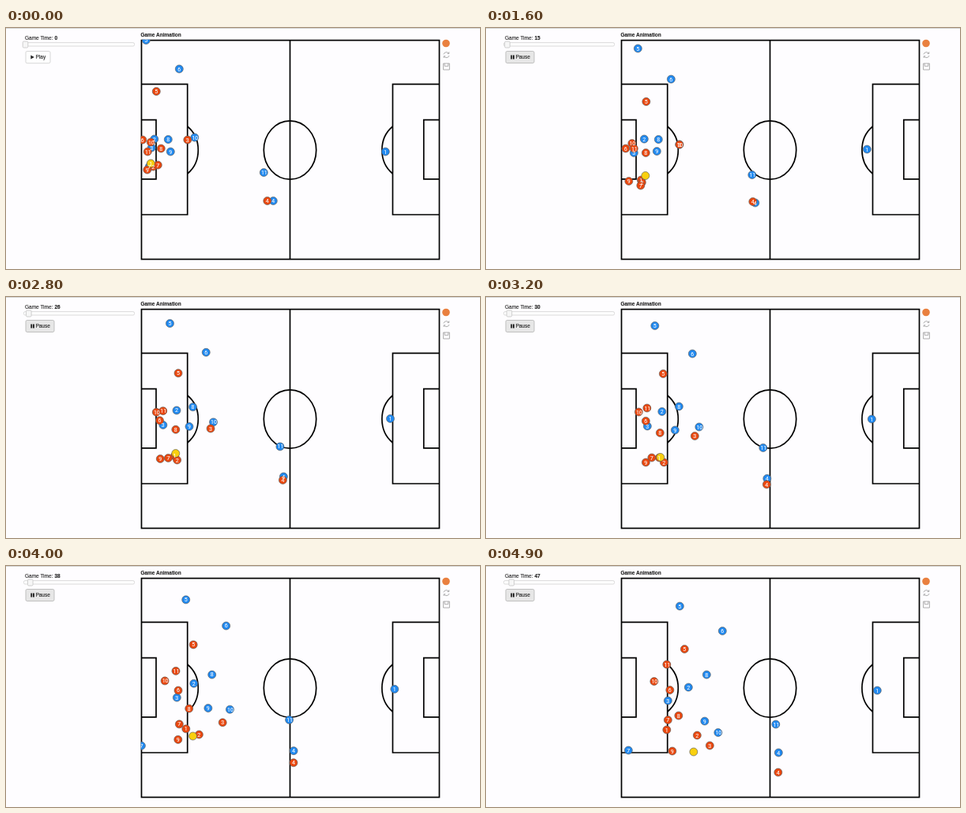
An HTML page that plays this animation: 600 by 306 pixels, repeating every 5 s.

```html
<!DOCTYPE html>
<html lang="en">
<head>
<meta charset="utf-8">
<title>Game Animation</title>
<style>
  html, body { margin: 0; width: 100%; height: 100%; overflow: hidden; background: #fefdff; }
  svg { display: block; width: 100vw; height: 100vh; }
  text { font: 6.5px "Liberation Sans", Arial, Helvetica, sans-serif; fill: #222; stroke: #222; stroke-width: .12; white-space: pre; }
  .bold { font-weight: bold; }
  .pitch { fill: none; stroke: #000; stroke-width: 1.7; }
  .box { stroke-width: .8; }
  .dots circle { stroke: #5c5c5c; stroke-width: .65; }
  .dots text { font: 7px Roboto, "Liberation Sans", sans-serif; fill: #fff; stroke: #fff; }
  .tool { fill: none; stroke: #a5a5a5; stroke-width: .9; }
</style>
</head>
<body>
<svg viewBox="0 0 600 306">
  <defs>
    <clipPath id="field"><rect x="170.5" y="14.7" width="378.6" height="279.6"/></clipPath>
  </defs>
  <rect width="600" height="1" fill="#d6d6d6"/>

  <text x="24" y="14.6">Game Time: </text>
  <text id="clock" class="bold" x="61.4" y="14.6">0</text>
  <rect class="box" x="22.5" y="18.6" width="140" height="4.4" rx="1.6" fill="#fdfdfd" stroke="#d2d2d2"/>
  <rect class="box" id="handle" x="21.2" y="17" width="6.6" height="8" rx="1.4" fill="#f6f6f6" stroke="#c4c4c4"/>

  <g id="play">
    <rect class="box" x="25" y="29.5" width="31" height="15.2" rx="1.8" fill="#fff" stroke="#ccc"/>
    <path d="M31.3 34.6L35.8 37L31.3 39.4Z" fill="#222"/>
    <text x="37.6" y="39.3">Play</text>
  </g>
  <g id="pause">
    <rect class="box" x="25" y="29.5" width="36" height="15" rx="1.8" fill="#e7e7e7" stroke="#b3b3b3"/>
    <path d="M31.3 34.6h1.9v4.8h-1.9zM34 34.6h1.9v4.8h-1.9z" fill="#222"/>
    <text x="37.4" y="39.3">Pause</text>
  </g>

  <text class="bold" x="170.4" y="10.6">Game Animation</text>

  <g class="pitch">
    <rect x="171.5" y="15.6" width="377" height="278"/>
    <path d="M359.5 15.6V293.6"/>
    <ellipse cx="359.5" cy="155" rx="33.2" ry="37.2"/>
    <path d="M171.5 71.3H229.7V237H171.5M171.5 116.7H190V191.8H171.5"/>
    <path d="M548.5 71.3H489.5V237H548.5M548.5 116.7H528.8V191.8H548.5"/>
    <path d="M229.7 125A33.2 37.2 0 0 1 229.7 185M489.5 125A33.2 37.2 0 0 0 489.5 185"/>
  </g>

  <g class="dots" clip-path="url(#field)" transform="translate(.3 0)">
    <g id="blue" fill="#2089f0"></g>
    <g id="red" fill="#ea470e"></g>
    <g id="ball" fill="#f9d00f"></g>
    <g id="labels"></g>
  </g>

  <circle cx="557" cy="19.5" r="4.8" fill="#e9803f"/>
  <g class="tool">
    <path d="M554 33.4A3.6 3.6 0 0 1 560.4 32.2M561 35A3.6 3.6 0 0 1 554.6 36.2"/>
    <path d="M560.8 30.4V32.6H558.6M554.2 38V35.8H556.4"/>
    <path d="M553.6 45H561.4V53H553.6ZM555.2 45V48.4H559.8V45"/>
  </g>
</svg>
<script>
const LOOP = 5000, STEP = 100;
const KEYS = [0, 15, 30, 47]; // game times of each runner's four points
const $ = id => document.getElementById(id);
const dots = [];

function make(tag, parent, attrs = {}) {
  const el = document.createElementNS("http://www.w3.org/2000/svg", tag);
  set(el, attrs);
  return $(parent).appendChild(el);
}

function set(el, attrs) {
  for (const k in attrs) el.setAttribute(k, attrs[k]);
}

function add(group, label, ...points) {
  const circle = make("circle", group, { r: 5 });
  const text = make("text", "labels");
  text.textContent = label;
  dots.push({ points, circle, text, shift: label.length > 1 ? 3.4 : 2 });
}

// Players are numbered in the order listed
const team = (group, runs) => runs.forEach((run, i) => add(group, String(i + 1), ...run));

team("blue", [
  [[480, 157], [482, 154], [488, 155], [495, 158]],
  [[187.5, 141], [200, 141], [222.5, 145.5], [256, 154]],
  [[184, 152], [187, 158.5], [204, 164], [230, 171]],
  [[338, 219.5], [340.5, 222], [355.5, 230.5], [370, 237]],
  [[177, 15.5], [192, 26], [213.5, 36.5], [245, 51]],
  [[219, 52], [234, 65], [261, 72], [299, 82.5]],
  [[181, 176], [163, 194], [165, 218], [180, 234]],
  [[205, 141.5], [218, 141.5], [244, 139], [279, 138]],
  [[208, 157], [216, 156.5], [239, 169], [276.5, 197]],
  [[238.5, 139], [244.5, 148], [269.5, 165], [293.5, 211.5]],
  [[326, 183.5], [336.5, 186.5], [350.5, 191.5], [366.5, 201]]
]);
team("red", [
  [[183, 172.5], [196, 193], [219, 204], [228.5, 208]],
  [[186, 176], [197, 196], [225, 210], [267, 215]],
  [[229.5, 142], [244.5, 148], [264, 176.5], [283, 228]],
  [[330.5, 219.5], [337.5, 220.5], [355, 238], [369.5, 262]],
  [[190, 80.5], [202.5, 93.5], [224, 97.5], [251, 105.5]],
  [[172.5, 142], [176.5, 153], [202, 157.5], [232.5, 157.5]],
  [[192, 174], [195.5, 200], [209.5, 204], [230, 195.5]],
  [[196, 153], [202, 158.5], [220, 172.5], [243.5, 190]],
  [[178.5, 180], [180.5, 194.5], [202, 210], [235.5, 235]],
  [[183, 145], [184.5, 146.5], [193, 146], [212.5, 146.5]],
  [[179, 157], [187, 153], [203.5, 141], [228.5, 125]]
]);
add("ball", "", [183, 172], [201.5, 187.5], [220.5, 203.5], [262.5, 236]);

// Weight of each point on the cubic through all four
const weights = t => KEYS.map(a =>
  KEYS.reduce((w, b) => b === a ? w : w * (t - b) / (a - b), 1));

function draw() {
  const step = Math.floor(performance.now() % LOOP / STEP);
  // the game clock starts one step late and pauses once midway
  const time = Math.max(0, step - (step < 28 ? 1 : 2));
  const w = weights(time);
  $("clock").textContent = time;
  set($("handle"), { x: 21.2 + time * 0.165 });
  $("play").style.display = step ? "none" : "";
  $("pause").style.display = step ? "" : "none";
  for (const { points, circle, text, shift } of dots) {
    const [x, y] = [0, 1].map(axis => points.reduce((sum, p, i) => sum + w[i] * p[axis], 0));
    set(circle, { cx: x, cy: y });
    set(text, { x: x - shift, y: y + 2.5 });
  }
  requestAnimationFrame(draw);
}
draw();
</script>
</body>
</html>
```
